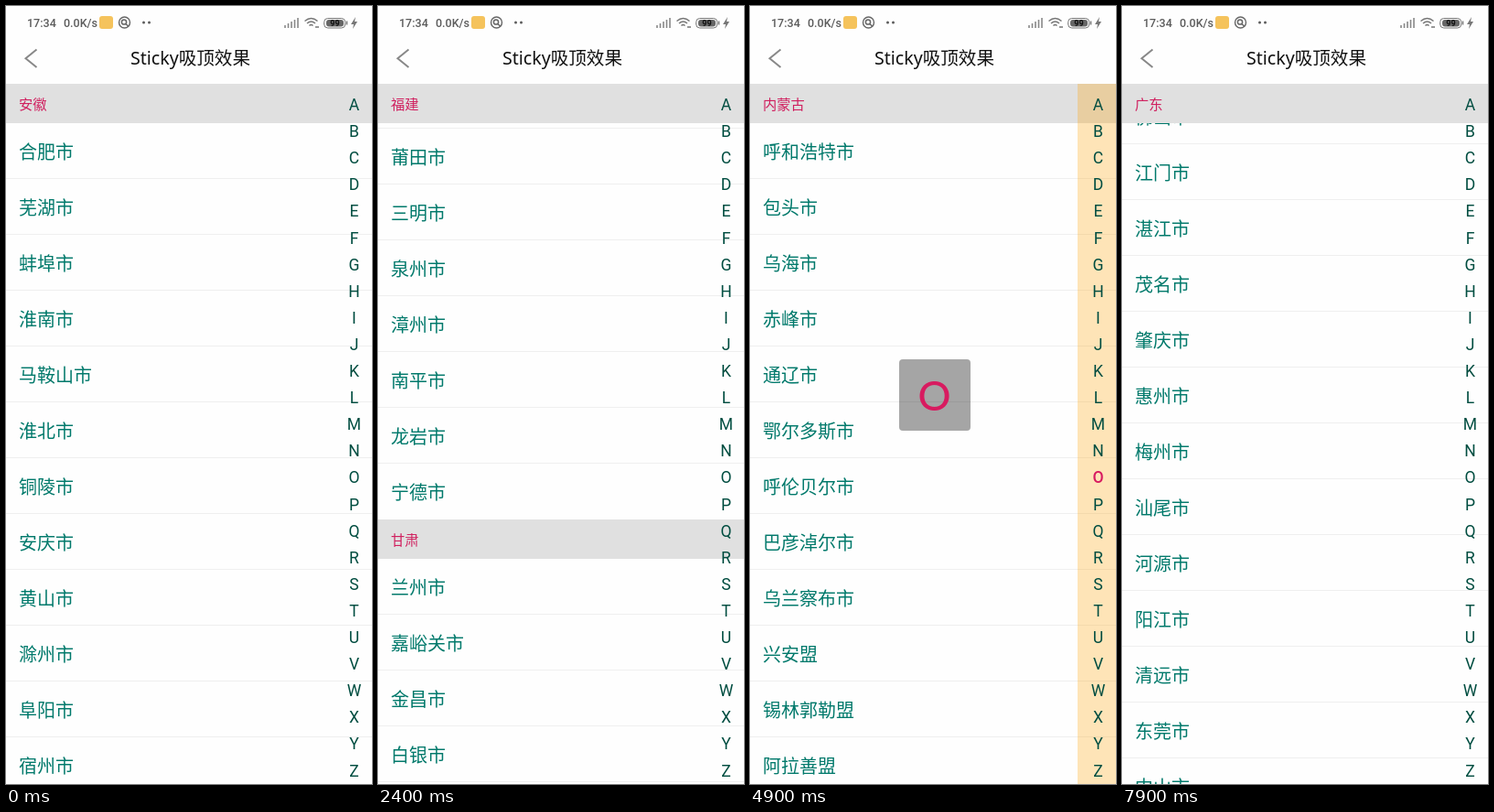
Write an HTML page that moves like this. It is 400 by 850 pixels and loops after 8 s.

```html
<!DOCTYPE html>
<html lang="zh-CN">
<head>
<meta charset="utf-8">
<style>
html, body { margin: 0; width: 100%; height: 100%; overflow: hidden; background: #fefefe; }
body { position: relative; font-family: "Noto Sans CJK SC", "Noto Sans CJK", sans-serif; }
body > * { position: absolute; }
#bar { left: 0; top: 0; }
#title { left: 0; top: 43px; width: 403px; text-align: center; color: #111;
  font: 500 19.6px/28px "Noto Sans", "Noto Sans CJK SC", sans-serif; }
#view { left: 0; top: 85px; width: 400px; height: 765px; overflow: hidden; }
#list { will-change: transform; }
.head { height: 43px; padding-left: 14px; background: #e0e0e0; color: #d0205f; font-size: 15.3px; line-height: 43px; }
.row { box-sizing: border-box; height: 61px; padding-left: 14px; border-bottom: 1px solid #efefef;
  color: #00796b; font-size: 20px; line-height: 61px; white-space: nowrap; }
.row.last { height: 60.5px; border: 0; }
#sticky { left: 0; top: 85px; width: 386px; }
#index { left: 358px; top: 85px; width: 42px; height: 765px; }
#index.on { background: rgba(255,160,0,.28); }
#index b { position: absolute; left: 2px; width: 41px; text-align: center; color: #004d40;
  font: 400 17.5px/20px Roboto, sans-serif; }
#index b.on { color: #d81b60; font-weight: 500; }
#tip { left: 162.5px; top: 385.5px; width: 78px; height: 78px; border-radius: 4px; background: rgba(0,0,0,.35);
  color: #d81b60; text-align: center; font: 500 45px/79px Lato, sans-serif; }
</style>
</head>
<body>
<svg id="bar" width="400" height="85" fill="none" stroke="#666" font-family="Roboto, sans-serif">
  <g fill="#5c5c5c" stroke="none" font-size="12.5" font-weight="500">
    <text x="23" y="23">17:34</text>
    <text x="63" y="23">0.0K/s</text>
    <rect x="102" y="11" width="15" height="14" rx="3" fill="#f5c35c"/>
    <circle cx="150.500" cy="18" r="1.500"/><circle cx="156.500" cy="18" r="1.500"/>
    <path d="M382 12l-5 8h3l-1 5 5-8h-3z" fill="#777"/>
  </g>
  <circle cx="129.500" cy="18" r="6" stroke-width="1.400"/>
  <circle cx="129" cy="17.500" r="2.600" stroke-width="1.500"/>
  <path d="M131 19.500l3 3" stroke-width="1.500"/>
  <path d="M305 24v-3M308.500 24v-5M312 24v-7M315.500 24v-9M319 24v-11" stroke="#888" stroke-width="1.600"/>
  <path d="M326.500 16.500q7-6 14 0M329 19q4.500-4 9 0M331.500 21.500q2-2 4 0M338 23h4" stroke="#777" stroke-width="1.500"/>
  <rect x="347.700" y="13.500" width="23" height="10.500" rx="4" stroke="#777"/>
  <rect x="350" y="15" width="19" height="7.500" rx="3" fill="#666" stroke="none"/>
  <path d="M372.500 16.500v4" stroke="#777" stroke-width="1.500"/>
  <text x="359.500" y="22" font-size="9" font-weight="700" text-anchor="middle" fill="#111" stroke="none">99</text>
  <path d="M33.500 47.500L21.500 57.300l12 9.700" stroke="#888" stroke-width="2"/>
</svg>
<div id="title">Sticky吸顶效果</div>
<div id="view"><div id="list"></div></div>
<div id="sticky" class="head"></div>
<div id="index"></div>
<div id="tip"></div>
<script>
const data = `A安徽 合肥 芜湖 蚌埠 淮南 马鞍山 淮北 铜陵 安庆 黄山 滁州 阜阳 宿州 六安 亳州 池州 宣城
A澳门 澳门特别行政区
B北京 北京
C重庆 重庆
F福建 福州 厦门 莆田 三明 泉州 漳州 南平 龙岩 宁德
G甘肃 兰州 嘉峪关 金昌 白银 天水 武威 张掖 平凉 酒泉 庆阳 定西 陇南 临夏回族自治州 甘南藏族自治州
G广东 广州 深圳 珠海 汕头 韶关 佛山 江门 湛江 茂名 肇庆 惠州 梅州 汕尾 河源 阳江 清远 东莞 中山 潮州 揭阳 云浮
H海南 海口 三亚 三沙
H河北 石家庄 唐山 秦皇岛 邯郸 邢台 保定 张家口 承德 沧州 廊坊 衡水
J吉林 长春 吉林 四平 辽源 通化 白山 松原 白城 延边朝鲜族自治州
J江苏 南京 无锡 徐州 常州 苏州 南通 连云港
L辽宁 沈阳 大连 鞍山 抚顺 本溪 丹东 锦州 营口 阜新 辽阳 盘锦 铁岭 朝阳 葫芦岛
N内蒙古 呼和浩特 包头 乌海 赤峰 通辽 鄂尔多斯 呼伦贝尔 巴彦淖尔 乌兰察布 兴安盟 锡林郭勒盟 阿拉善盟
Q青海 西宁 海东 海北藏族自治州 黄南藏族自治州 海南藏族自治州 果洛藏族自治州 玉树藏族自治州 海西蒙古族藏族自治州
S山东 济南 青岛 淄博 枣庄 东营 烟台 潍坊 济宁 泰安 威海 日照 莱芜 临沂 德州 聊城 滨州 菏泽`;
const letters = [..."ABCDEFGHIJKLMNOPQRSTUVWXYZ"];
const el = id => document.getElementById(id);
const list = el("list"), sticky = el("sticky"), index = el("index"), tip = el("tip");

function add(parent, tag, cls, text) {
  const e = document.createElement(tag);
  e.className = cls;
  e.textContent = text;
  return parent.appendChild(e);
}

let end = 0;
const sections = data.split("\n").map(line => {
  const [head, ...names] = line.split(" ");
  const name = head.slice(1), top = end;
  add(list, "div", "head", name);
  names.forEach((n, i) => add(list, "div", i == names.length - 1 ? "row last" : "row",
    /(自治州|行政区|盟)$/.test(n) ? n : n + "市"));
  end += 43 + 61 * names.length - 0.5;
  return { at: letters.indexOf(head[0]), name, top };
});
const marks = letters.map((c, i) => {
  const b = add(index, "b", "", c);
  b.style.top = 13 + 29.1 * i + "px";
  return b;
});

// [seconds, value] pairs, linear in between
const flings = [[0.7, 0], [0.8, 60], [1, 370], [1.2, 640], [1.4, 850], [1.6, 1004], [1.8, 1161.5], [2.1, 1340],
  [2.5, 1480], [2.8, 1740], [3.2, 2012.5], [3.5, 2100], [3.9, 2130]];
const lastFling = [[7.2, 1122], [7.3, 1260], [7.5, 2020], [7.7, 2680], [7.9, 3160]];
const drag = [[4.1, 0], [4.9, 14], [5.2, 18], [6, 1]];

function follow(keys, t) {
  if (t <= keys[0][0]) return keys[0][1];
  for (let i = 1; i < keys.length; i++) {
    const [a, x] = keys[i - 1], [b, y] = keys[i];
    if (t <= b) return x + (y - x) * (t - a) / (b - a);
  }
  return keys[keys.length - 1][1];
}

// letters without a section keep the one passed before
function jump(letter, down) {
  const hit = down
    ? sections.filter(s => s.at <= letter).pop().at
    : sections.find(s => s.at >= letter).at;
  return sections.find(s => s.at == hit).top;
}

function draw(t) {
  const held = t >= 4.1 && t < 6.1;
  const letter = held ? Math.round(follow(drag, t)) : -1;
  const y = held ? jump(letter, t <= 5.2) : follow(t < 4.1 ? flings : lastFling, t);
  list.style.transform = `translateY(${-y}px)`;
  sticky.textContent = sections.filter(s => s.top <= y + 0.01).pop().name;
  index.className = held ? "on" : "";
  marks.forEach((m, i) => m.className = i == letter ? "on" : "");
  tip.style.display = held ? "block" : "none";
  tip.textContent = letters[letter] || "";
}

const start = performance.now();
function tick() {
  const ms = (performance.now() - start) % 8000;
  draw(Math.floor(ms / 100) / 10);
  requestAnimationFrame(tick);
}
tick();
</script>
</body>
</html>
```
